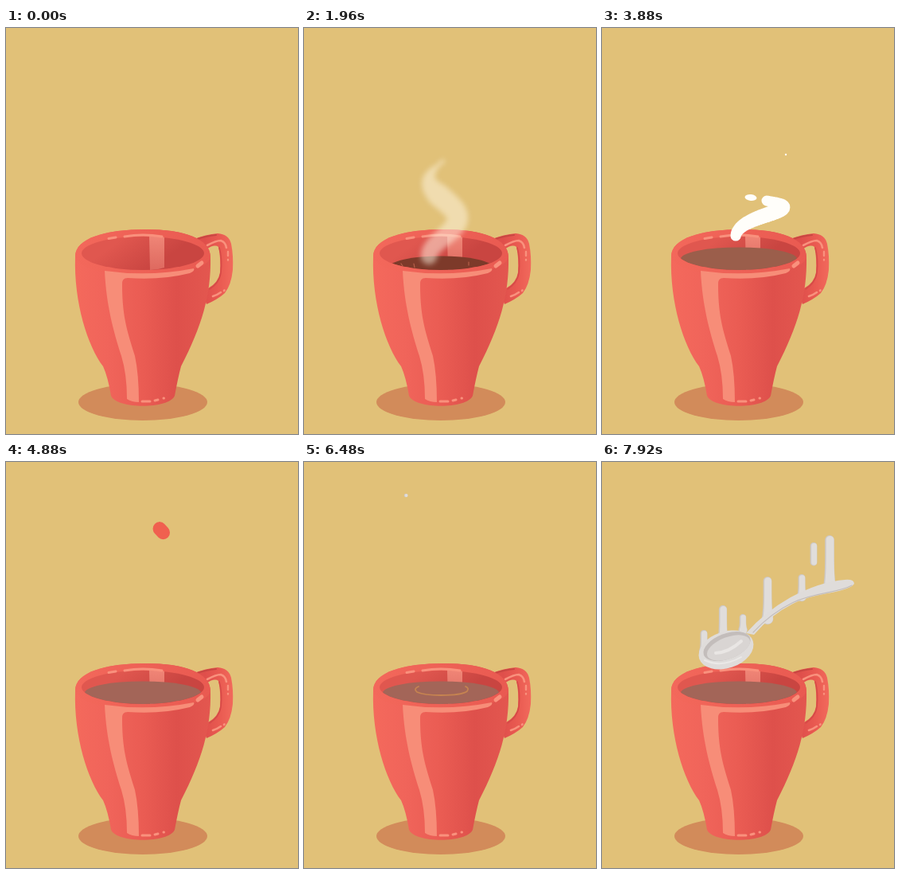
Animation, 367 px wide and 510 px high, one loop 8 s. Source, as an HTML page with a canvas:

```html
<!DOCTYPE html>
<html lang="en">
<head>
<meta charset="utf-8">
<title>Coffee mug</title>
<style>
html, body { margin: 0; width: 100%; height: 100%; overflow: hidden; background: #e1c178; }
canvas { display: block; width: 100%; height: 100%; }
</style>
</head>
<body>
<canvas id="stage" width="367" height="510"></canvas>
<script>
const ctx = document.getElementById('stage').getContext('2d');
const LOOP = 8000;
const { sin, cos, PI } = Math;

const clamp = (v, lo = 0, hi = 1) => Math.min(hi, Math.max(lo, v));
const mix = (a, b, k) => a + (b - a) * k;
// Value going from a to b while t goes from t0 to t1.
const ramp = (t, t0, t1, a = 0, b = 1) => mix(a, b, clamp((t - t0) / (t1 - t0)));
const blend = (a, b, k) => `rgb(${a.map((v, i) => Math.round(mix(v, b[i], k)))})`;

function fill(d, color) {
  ctx.fillStyle = color;
  ctx.fill(new Path2D(d), 'evenodd');
}

function stroke(d, color, width) {
  ctx.strokeStyle = color;
  ctx.lineWidth = width;
  ctx.lineCap = ctx.lineJoin = 'round';
  ctx.stroke(new Path2D(d));
}

function oval(x, y, rx, ry, color, angle = 0) {
  ctx.beginPath();
  ctx.ellipse(x, y, rx, ry, angle, 0, 7);
  ctx.fillStyle = color;
  ctx.fill();
}

function gradient(x0, y0, x1, y1, ...colors) {
  const g = ctx.createLinearGradient(x0, y0, x1, y1);
  colors.forEach((c, i) => g.addColorStop(i / (colors.length - 1), c));
  return g;
}

// Each stream maps v = 0..1 along its centre line to [x, y, radius].
const coffee = v => [172 + 27 * sin(PI * v), 59 + 243 * v, 15 - 6.5 * v + 8 * v ** 16];
const steam = v => [175 - 18 * cos(5 * PI * v), 287 - 240 * v, 8 + 7 * sin(2.6 * v + 0.3)];
const syrup = v => [182 + 38 * sin(2 * PI * v - 0.12), 68 + 240 * v, 8.5];

// Milk sways down, then curls over into the cup.
function milk(v) {
  if (v < 0.5) return [215 - 16 * v + 20 * sin(4 * PI * v), 52 + 330 * v, 6.5];
  const k = (v - 0.5) * 2.5, m = 1 - k;
  const curve = (a, b, c, d) => a * m ** 3 + 3 * b * m * m * k + 3 * c * m * k * k + d * k ** 3;
  return [curve(207, 270, 170, 168), curve(217, 230, 232, 262), 6.5 + 3 * sin(PI * clamp(k))];
}

// Draws the part of a stream between positions a and b.
function pour(stream, a, b, color, scale = 1, taper = 0) {
  if (b < a || a >= 1 || scale <= 0) return;
  const path = new Path2D();
  for (let i = 0; i <= 160; i++) {
    const v = mix(a, b, i / 160), [x, y, r] = stream(v);
    const size = Math.max(0.1, r * scale * (taper ? clamp((b - v) / taper, 0.15, 1) : 1));
    path.moveTo(x + size, y);
    path.arc(x, y, size, 0, PI * 2);
  }
  ctx.fillStyle = color;
  ctx.fill(path);
}

// Drops thrown up from the surface.
function splash(t, t0, color, reach) {
  const k = (t - t0) / 560;
  if (k <= 0 || k >= 1) return;
  for (let i = 0; i < 6; i++) {
    const side = (i - 2.5) / 2.5, up = 34 + 13 * (i * 5 % 3);
    oval(171 + side * reach * k, 291 - 4 * up * k * (1 - k), 3.5 - 2 * k, 4.5 - 2 * k, color, side);
  }
}

function drawMug() {
  const shine = '#f9917d';
  oval(172, 470, 81, 23, '#d28b5a');

  // handle
  fill('M234 266Q252 259 266 258Q280 259 283 271Q286 286 285 304Q283 323 275 333' +
    'Q266 341 252 347L246 330ZM252 278Q262 271 267 275Q270 287 269 307Q267 320 254 327Z',
    gradient(250, 0, 286, 0, '#df4f4b', '#e95a51', '#f26a5c'));
  stroke('M238 266Q252 261 264 260', '#c94742', 2);
  stroke('M268 276Q272 290 270 308Q268 320 256 328', '#d64a47', 1.6);
  stroke('M253 273Q264 267 270 267Q276 269 277 276', shine, 2.6);
  stroke('M279 281V286M279 291V291.5', shine, 2.4);
  stroke('M260 337Q266 335 270 332M274 330L274.5 329.5', shine, 2.6);

  // body, inside and rim
  const rim = 'M87 287C87 264 125 253 176 253C222 253 257 264 257 288';
  fill(rim + 'C258 335 246 375 220 425Q216 440 212 462C205 479 139 479 132 462' +
    'Q128 438 122 425C103 400 85 345 87 287Z',
    gradient(87, 0, 257, 0, '#f4695c', '#f0645a', '#ea5c53', '#de504b', '#e3574f'));
  fill(rim + 'C250 317 96 321 87 287Z', gradient(87, 0, 257, 0, '#f3685b', '#e95a51'));
  oval(172, 283, 77, 21, gradient(150, 262, 180, 304, '#e0574f', '#c94541'));
  fill('M180 261Q190 260 199 263V301Q190 304 181 304Z',
    gradient(0, 260, 0, 304, '#f08677', '#de695f'));

  // shine
  stroke('M129 264.5L138 263', shine, 3);
  stroke('M149 262Q172 258 196 262', shine, 3);
  fill('M124 305Q180 313 236 302Q238 305 231 308Q195 317 153 314Q145 314 146 323' +
    'C146 366 154 385 162 412Q167 435 167 470Q158 470 152 466Q152 435 145 412' +
    'C135 381 126 348 124 305Z', '#f78d78');
  stroke('M241 299L246 295', shine, 5);
  stroke('M171 469H181M187 468L191 467M198 465H198.5', shine, 3);
}

function drawSurface(t) {
  if (t < 700) return;
  const level = ramp(t, 700, 1700, 0, 0.5) + ramp(t, 2600, 3600, 0, 0.5);
  const milky = blend([125, 58, 42], [155, 94, 75], ramp(t, 3100, 3880));
  ctx.save();
  ctx.beginPath();
  ctx.ellipse(172, 283, 77, 21, 0, 0, 7);
  ctx.clip();
  oval(172, mix(312, 290, level), mix(58, 73, level), 14.5,
    t < 3880 ? milky : blend([155, 94, 75], [163, 101, 88], ramp(t, 3880, 4400)));
  ctx.restore();

  if (t > 1720) {
    ctx.globalAlpha = ramp(t, 2000, 2200, 1, 0);
    stroke('M138 296L139 301M207 294V298M122 296L124 299', '#b8604a', 1.2);
  }
  // drizzle ring
  ctx.globalAlpha = ramp(t, 6000, 6400) * ramp(t, 6560, 6960, 1, 0);
  stroke('M144 282Q137 285 142 289Q151 293 172 293Q198 293 205 288Q208 284 203 282',
    '#c68350', 1.8);
  ctx.globalAlpha = 1;
}

function drawSteam(t) {
  if (t < 1720 || t > 2600) return;
  ctx.save();
  ctx.filter = 'blur(3px)';
  ctx.globalAlpha = ramp(t, 2240, 2580, 0.5, 0);
  pour(steam, ramp(t, 2000, 2560, 0, 0.75), ramp(t, 1720, 1960, 0.1, 0.5) + ramp(t, 1960, 2360, 0, 0.5),
    '#fff8e6', 1, 0.18);
  ctx.restore();
}

function drawLiquids(t) {
  const brown = '#7d3a2b', white = '#fffefa', red = '#f0604f';

  pour(coffee, ramp(t, 840, 1320), ramp(t, 160, 600), brown, ramp(t, 0, 160));
  splash(t, 1080, brown, 46);
  drawSteam(t);

  pour(milk, ramp(t, 2960, 3440), ramp(t, 2760, 3120), white, ramp(t, 2640, 2800));
  splash(t, 3080, white, 50);
  pour(milk, ramp(t, 3640, 4120), ramp(t, 3400, 3936), white, ramp(t, 3360, 3480));
  if (t > 3780 && t < 4020) {
    const drift = (t - 3880) / 20;
    oval(187 + drift, 213 + drift / 3, 7.5, 4, white, 0.1);
    oval(231, 159 + drift * 2, 1.2, 1.2, white);
  }
  splash(t, 4000, white, 55);

  pour(syrup, ramp(t, 4920, 5200, 0.066, 0) + ramp(t, 5520, 6080), ramp(t, 4920, 5600, 0.086, 1),
    red, ramp(t, 4640, 4880));
  splash(t, 5680, red, 80);
}

function drawDrip(t, x, top, i) {
  const bowl = 238 - 0.55 * (x - 128), stem = 153 + 0.0037 * (317 - x) ** 2;
  const loose = i === 5;
  const base = loose ? top + 25 : x < 190 ? bowl : stem;
  const r = 3.5 + (base - top) / 28, start = 6500 + 130 * i;
  const head = ramp(t, start, start + 320, 42, base);
  const tail = Math.min(head, ramp(t, start + 150, 7920, 42, top + r));
  const flare = loose ? 0 : 0.35;
  const drip = (dx, inset) => v => [x + dx, mix(tail, head, v), r * (1 + flare * v ** 4) - inset];
  const size = ramp(t, start - 80, start + 80);
  pour(drip(0, 0), 0, 1, '#cdc8c6', size);
  pour(drip(0.6, 0.9), 0, 1, '#e0dddb', size);
}

function drawSpoon(t) {
  const light = '#dfdcda', shade = '#c3bdbb';
  // x and top of each metal drip
  [[128, 211], [152, 180], [177, 191], [208, 144], [251, 141], [266, 101], [286, 92]]
    .forEach(([x, top], i) => drawDrip(t, x, top, i));

  ctx.save();
  ctx.beginPath();
  ctx.rect(0, 0, ramp(t, 6880, 7800, 115, 320), 510);
  ctx.clip();
  fill('M181 215Q205 188 237 170Q275 150 305 148Q317 147 317 153L314 156' +
    'C296 166 268 164 240 178Q212 192 191 217Z', light);
  stroke('M190 214Q212 190 240 176.5C268 163 296 165 314 155', shade, 1.2);
  oval(156, 236, 35.5, 23, light, -0.32);
  oval(157, 231.5, 31, 16, shade, -0.36);
  oval(159, 233.5, 28.5, 13.5, '#d9d5d3', -0.36);
  stroke('M143 240Q160 239 175 225', '#e9e6e4', 4);
  stroke('M129 249Q150 259 175 245', '#ebe9e7', 2);
  ctx.restore();
}

// The motion runs in steps, with two short rests.
function step(t) {
  if (t >= 5280 && t < 5520) return 5280;
  if (t >= 7440 && t < 7760) return 7440;
  if (t >= 1760 && t < 2600) return Math.floor(t / 40) * 40;
  const shift = t < 4600 ? 40 : 0;
  return Math.max(0, Math.floor((t - shift) / 80) * 80 + shift);
}

function draw(now) {
  const t = step(now % LOOP);
  ctx.fillStyle = '#e1c178';
  ctx.fillRect(0, 0, 367, 510);
  drawMug();
  ctx.save();
  // everything above the front lip
  ctx.clip(new Path2D('M0 0H367V283H249A77 21 0 0 1 95 283H0Z'));
  drawSurface(t);
  drawLiquids(t);
  drawSpoon(t);
  ctx.restore();
  requestAnimationFrame(draw);
}
requestAnimationFrame(draw);
</script>
</body>
</html>
```
